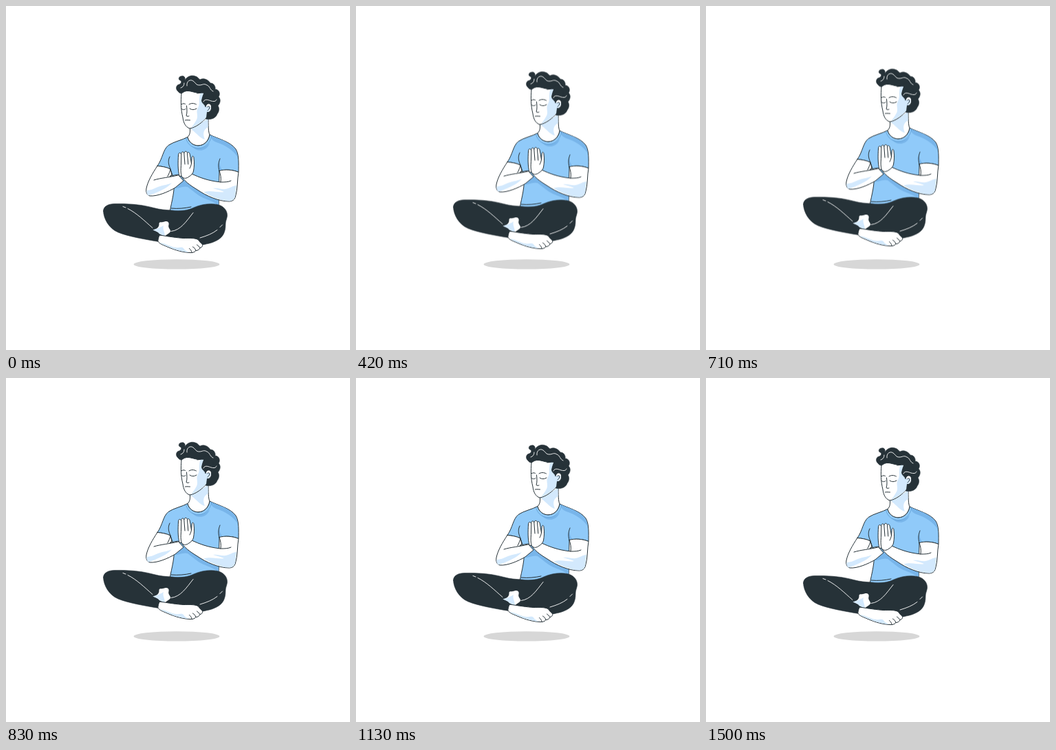
An HTML page that plays this animation: 500 by 500 pixels, repeating every 1.54 s.

```html
<!DOCTYPE html>
<html lang="en">
<head>
<meta charset="utf-8">
<title>Levitating meditation</title>
<style>
  html, body { margin: 0; width: 100%; height: 100%; overflow: hidden; background: #fff; }
  svg { display: block; width: 100%; height: 100%; }

  .figure { animation: hover 1540ms -4ms infinite; }
  .figure path { stroke-linecap: round; stroke-linejoin: round; }
  .ink { fill: #263238; stroke: #263238; stroke-width: .6; }
  .skin { fill: #fff; }
  .tint { fill: #d3e9fd; }
  .shirt { fill: #90caf9; }
  .fold { fill: #78b5ea; }
  .edge { stroke: #263238; stroke-width: 1; }
  .line { fill: none; stroke: #263238; stroke-width: 1; }
  .hem { fill: none; stroke: #5f9fd6; stroke-width: .8; }
  .seam { fill: none; stroke: #fff; stroke-width: .9; }

  @keyframes hover {
    0% { transform: translateY(0); animation-timing-function: steps(17, end); }
    46% { transform: translateY(-9.74px); animation-timing-function: steps(18, end); }
    94.7% { transform: translateY(.57px); animation-timing-function: steps(1, end); }
    97.4%, 100% { transform: translateY(0); }
  }
</style>
</head>
<body>
<svg viewBox="0 0 500 500">
  <ellipse cx="248" cy="375.4" rx="62.4" ry="7.2" fill="#d7d7d7"/>

  <g class="figure">
    <g id="shirt">
      <path class="shirt edge" d="M264 190.500C256 195 244 197 236 202.500C228 209 228 221 220 232.500C226 233 233 234 239 237L244 252C246 266 241 284 238 299L309 295L310 240C318 237 330 238 338 241.500C338 230 339 216 334 208C326 197 308 193 296 187C292 208 268 207 264 190.500Z"/>
      <path class="fold" d="M297 188C309 193 325 197 333 208C335 211 336 215 337 220C330 209 318 202 307 198.500C302 197 298 194 297 188Z"/>
      <path class="fold" d="M270 203C277 208 288 208 296 199C293 211 277 214 270 203Z"/>
      <path class="fold" d="M246 265L258 252L276 264L309 281L309 290C302 284 294 282 287 279C278 275 270 267 264 263C258 261 252 265 246 265Z"/>
      <path class="fold" d="M310 224C308 230 309 236 310 240L314 238C311 234 310 229 310 224Z"/>
      <path class="hem" d="M261.500 192C266 212 294 213 299 188.500"/>
      <path class="line" d="M239 237C236 230 235 225 238 219M310 240C308 232 309 227 311 222M240 294C250 295 260 294 269 292"/>
    </g>

    <g id="neck">
      <path class="skin edge" d="M267 174C268 181 268 187 264 190.500C268 207 292 208 296 187C294 183 294 174 294 160Z"/>
      <path class="tint" d="M267.500 178.500C274 177 283 171 293.500 163L293.600 176C288 179 285 184 289 194C281 192 275 182 267.500 178.500Z"/>
    </g>

    <g id="legs">
      <path class="ink" d="M141.500 298C141.500 291 149 287.500 158 287.500C180 287 199 289 215 293.500C224 296 232 296.500 241 297C253 299 265 297 273 293C284 288 297 286.500 307 288.500C317 290.500 322 298 321.500 305C321 310 319 312 319 318C319 328 316 336 306 341C299 345 290 346 284 347.500L222 342.500C201 339 178 335 163 329C149 323 142 309 141.500 298Z"/>
      <path class="skin" d="M213.500 325.500C219 324 223 322 222.500 316C223 313 228 315 230 313.500C234 312 237.500 314 236.500 318C235 323 240 325 239 328C237 331 233 332 231 335L223 331C221 328 217 327 213.500 325.500Z"/>
      <path class="tint" d="M213.500 325.500C220 324 226 321 229 319C227 324 231 328 231 335L223 331C221 328 217 327 213.500 325.500Z"/>
      <path class="seam" d="M170 291.500L174 293M177 294.500C190 301 201 312 213 322.500M272 300.500C262 313 254 326 240 327.500M282 337C292 334 300 331 307 325.500M311 321.500L314.500 318"/>
    </g>

    <g id="foot">
      <path class="skin edge" d="M223.500 333C236 335 249 337 258 337.500C267 337.500 274 337 279 339.500C281 341.500 282 344 284.500 345.500C287 348 285 351 282 351.500C281 354 279 355.500 276 355.500C274 358 271 359 267 358.500C254 358 241 353 231 348.500C224 346 220 343 221 340C221.500 337 222 335 223.500 333Z"/>
      <path class="tint" d="M223 344C231 344 238 350 247 351C252 352 255 349 258 352C259 355 263 356 266 358C253 357 240 352 231 348Z"/>
      <path class="line" d="M277.500 347C279 348 281 350 282 351.500M271.500 350C273.500 351 275 353 276 355.500M266.500 352.500C268 353.500 269.500 355.500 270 358"/>
    </g>

    <g id="arms">
      <path class="skin edge" d="M220 232.500C213 243 206 255 204 265C203 271 205 275 209 276C220 277 236 270 246 264L258 254L250 245C244 246 240 247 238 247.500L241 246L239 237C233 234 226 233 220 232.500Z"/>
      <path class="tint" d="M204.500 268C212 268 217 264 224 262C230 260 235 260 241 257C235 264 226 268 219 271C214 273 209 275 207 275.500C205 274 204 271 204.500 268Z"/>
      <path class="line" d="M215 253C224 250 238 249 250 246M239 237C238 241 237 244 235 247.500"/>
      <path class="skin edge" d="M310 239.500C318 237 330 238 338 241.500C336 252 337 266 333.500 277C332 282 329 284 324 284C309 284 291 276 278 267C270 262 262 257 256 249L270 244C281 249 293 254 312 256C313 250 312 245 310 239.500Z"/>
      <path class="tint" d="M335 261C329 261 326 265 319 266C313 267 308 264 301 265C307 267 313 268 317 270C310 272 299 267 287 270.500C300 278 313 283.500 324 283.500C329 283.500 332 281 333 277Z"/>
      <path class="line" d="M312 256C318 256 323 256 327 254"/>
    </g>

    <g id="hands">
      <path class="skin edge" d="M252 247C249.500 238 250 226 250.500 217C250.500 213 253 212.500 254.500 215L258 219L258 247Z"/>
      <path class="skin edge" d="M256 249C253 244 254.500 235 254.500 229L254.800 214.500C255 211.500 258 211 258.800 214C259.300 210.500 262.800 210.500 263.500 213.500C265.500 211.500 267 213.500 267.300 216L269.500 229C270 226 269.800 222 270.300 219.500C271 217.500 273 218 273 221C274 228 273.500 234 272.500 240C271.500 244 269 246 266 248C262 251 259 251 256 249Z"/>
      <path class="line" d="M258.800 214L260 230M263.500 214L264.800 230M269.500 229C269 232 268 234 267 236"/>
    </g>

    <g id="head">
      <path class="ink" d="M250 124C246 121 247 115 251.500 114C255 113 256 109 253 108C250 107 251 102 255 102C259 101 261 104 260 108C263 102 270 100 275 102C279 103 280 106 282 107C287 104 294 107 297 112C302 112 305 117 304 121C310 121 312 128 309 132C313 136 311 142 308 145C311 149 309 155 307 157C305 163 298 166 290 164L278 129L255 127C253 127 251 126 250 124Z"/>
      <path class="skin edge" d="M255 127C254 139 254 150 257 162C258 170 261 176 267 178C275 177 286 169 291 162L292 154C297 156 300 149 298 144C296 140 291 142 290 146L284 138L288 126C278 128 272 124 265 123.500C261 123 258 125 255 127Z"/>
      <path class="tint" d="M283 126.500C279 133 283 141 279 148C275 155 281 160 276 167C274 171 271 174 269 177C277 174 286 168 291 162L292 154C296 155 298 149 297 146L291 146L284 138L287 127Z"/>
      <path class="ink" d="M278 127C282 127 285 125 288 126C286 131 284 135 285 140C287 143 289 143 290 147C291 142 295 140 298 143L302 132L294 120Z"/>
      <path class="line" d="M292.500 147C294 144.500 297 146 295.500 149C294.500 151 293.500 151 293 152"/>
      <path class="line" d="M255 143C257 141.500 259 141.500 260.500 142.500M266 143C269 141 273 141 276.500 143M254.800 149C257 151.500 260 151 261 149.500M267 149C270 151.500 274 151 277 149M262.500 145C263 151 263.500 155 262 159.500C263 160.500 265 160.500 266 160M260.500 166C263 165.500 265 166 267.500 166"/>
      <path class="seam" d="M263 116C262 109 268 106 272 109C276 112 276 115 281 115C286 115 287 112 292 115C297 117 296 122 301 124M287 139C289 134 295 137 298 138C302 139 305 139 306 136"/>
      <path class="seam" d="M254 119C257 118 259 116 259 112"/>
    </g>
  </g>
</svg>
</body>
</html>
```
